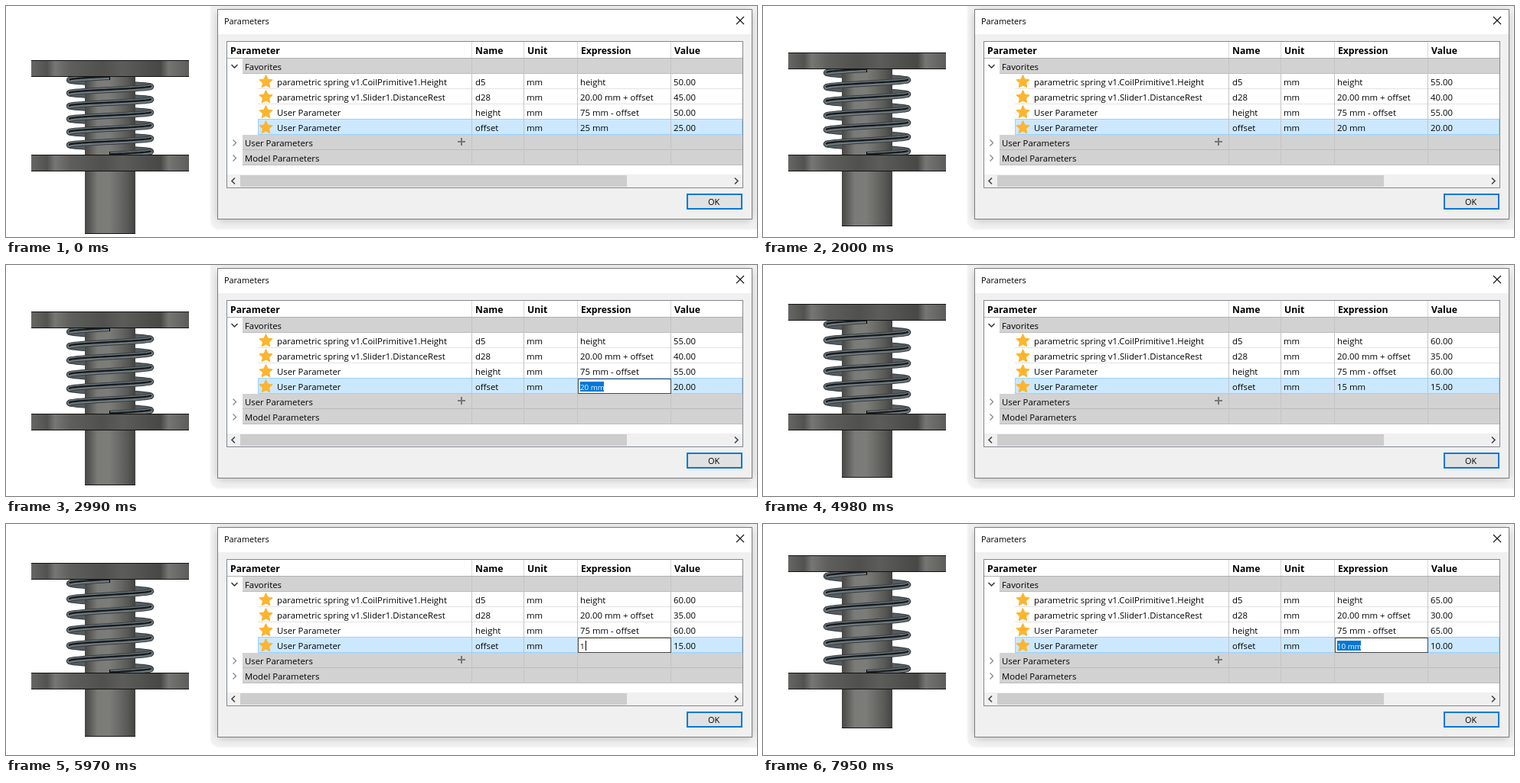
Recreate the animation shown at these times as an HTML page with a canvas. Size 981 px wide and 303 px high, loop 8000 ms.

```html
<!DOCTYPE html>
<html lang="en">
<head>
<meta charset="utf-8">
<title>Parametric spring</title>
<style>
html, body { margin: 0; width: 981px; height: 303px; overflow: hidden; background: #fff; }
canvas { display: block; }
</style>
</head>
<body>
<canvas id="stage" width="981" height="303"></canvas>
<script>
const ctx = document.getElementById('stage').getContext('2d');
const LOOP = 8000;
const AXIS = 136, SEAT = 195, TURNS = 6;
const COLUMNS = [608, 676, 746, 868];
const ROW_TOP = 69, ROW = 20;

// start time, offset in mm, edit field (mode and text)
const STEPS = [
  { at: 0, offset: 25 },
  { at: 1000, offset: 25, edit: '25 mm', mode: 'selected' },
  { at: 2000, offset: 20 },
  { at: 2990, offset: 20, edit: '20 mm', mode: 'selected' },
  { at: 3990, offset: 20, edit: '1', mode: 'caret' },
  { at: 4980, offset: 15 },
  { at: 5970, offset: 15, edit: '1', mode: 'caret' },
  { at: 6960, offset: 15, edit: '10' },
  { at: 7950, offset: 10, edit: '10 mm', mode: 'selected' }
];

function rect(x, y, w, h, fill) {
  ctx.fillStyle = fill;
  ctx.fillRect(x, y, w, h);
}

function frame(x, y, w, h, color, size = 1) {
  ctx.strokeStyle = color;
  ctx.lineWidth = size;
  ctx.strokeRect(x + size / 2, y + size / 2, w - size, h - size);
}

function text(str, x, y, { size = 11.35, weight = 400, color = '#000', align = 'left' } = {}) {
  ctx.font = `${weight} ${size}px "Open Sans", "Noto Sans", sans-serif`;
  ctx.textAlign = align;
  ctx.fillStyle = color;
  ctx.fillText(str, x, y);
}

function line(points, color, width = 1) {
  ctx.strokeStyle = color;
  ctx.lineWidth = width;
  ctx.beginPath();
  points.forEach(([x, y]) => ctx.lineTo(x, y));
  ctx.stroke();
}

function shade(x0, x1, stops) {
  const g = ctx.createLinearGradient(x0, 0, x1, 0);
  stops.forEach(([at, color]) => g.addColorStop(at, color));
  return g;
}

const plateFill = shade(33, 239, [
  [0, '#666764'], [.1, '#525250'], [.15, '#767774'], [.25, '#5e5f5c'], [.45, '#50504e'],
  [.58, '#5c5c5a'], [.76, '#4c4c4a'], [.82, '#484846'], [.87, '#757672'], [1, '#5c5d5a']
]);
const shaftFill = shade(103, 169, [
  [0, '#474745'], [.1, '#5a5b58'], [.25, '#7a7b77'], [.48, '#7c7d79'],
  [.65, '#6c6d69'], [.85, '#585956'], [1, '#424240']
]);

function plate(y) {
  rect(33, y, 206, 21, plateFill);
  rect(33, y, 206, 1, '#111');
  rect(33, y + 21, 206, 1, '#111');
}

// Half turns of the helix lie either behind or in front of the shaft.
function coil(pitch, front) {
  const end = TURNS * 2 * Math.PI;
  const first = front ? -.5 : .5;
  for (let h = first; h < TURNS * 2; h += 2) {
    const from = Math.max(0, h * Math.PI), to = Math.min(end, (h + 1) * Math.PI);
    if (to <= from) continue;
    const path = shift => {
      const points = [];
      for (let i = 0; i <= 24; i++) {
        const a = from + (to - from) * i / 24;
        points.push([AXIS + 53 * Math.sin(a), SEAT - pitch * a / (2 * Math.PI) + shift]);
      }
      return points;
    };
    ctx.lineCap = from === 0 || to === end ? 'butt' : 'round';
    line(path(0), '#353b3f', 8);
    line(path(0), front ? '#70797d' : '#555d61', 6);
    if (front) line(path(-.5), '#171b1d', 2.4);
  }
  ctx.lineCap = 'butt';
}

function spring(offset) {
  const step = (25 - offset) / 5;
  const top = 71 - 10 * step;
  const bottom = Math.round(298 - 10.2 * step);
  const under = top + 22;

  ctx.save();
  ctx.beginPath();
  ctx.rect(70, under, 135, SEAT - under);
  ctx.clip();
  coil((SEAT - under) / TURNS, false);
  rect(103, under, 66, SEAT - under, shaftFill);
  coil((SEAT - under) / TURNS, true);
  rect(135, SEAT - 4, 1, 4, '#000');
  rect(135, under, 1, 4, '#000');
  ctx.restore();

  rect(103, 216, 66, bottom - 216, shaftFill);
  rect(103, bottom, 66, 1, '#111');
  plate(top);
  plate(SEAT);
}

function star(x, y) {
  ctx.fillStyle = ctx.strokeStyle = '#fdb52e';
  ctx.lineWidth = 1.5;
  ctx.lineJoin = 'round';
  ctx.beginPath();
  for (let i = 0; i < 10; i++) {
    const a = i * Math.PI / 5, r = i % 2 ? 4 : 8.5;
    ctx.lineTo(x + r * Math.sin(a), y - r * Math.cos(a));
  }
  ctx.closePath();
  ctx.fill();
  ctx.stroke();
  ctx.lineJoin = 'miter';
}

function chevron(x, y, dx, dy, color, width = 1.3) {
  const p = dx ? [[x - dx, y - 4], [x + dx, y], [x - dx, y + 4]]
               : [[x - 4, y - dy], [x, y + dy], [x + 4, y - dy]];
  line(p, color, width);
}

function shadow(x, y, w, h, blur, color) {
  ctx.save();
  ctx.filter = `blur(${blur}px)`;
  ctx.fillStyle = color;
  ctx.beginPath();
  ctx.roundRect(x, y, w, h, 12);
  ctx.fill();
  ctx.restore();
}

function dialog() {
  shadow(267, -12, 725, 305, 1, '#f0f0f0');
  shadow(274, 4, 703, 280, 3, '#d2d2d2');
  rect(276, 4, 699, 276, '#f0f0f0');
  rect(276, 4, 699, 33, '#fff');
  frame(276, 4, 699, 276, '#7c7c7c');
  text('Parameters', 285, 24, { size: 10.9 });
  line([[954, 14], [964, 24]], '#111', 1.1);
  line([[964, 14], [954, 24]], '#111', 1.1);

  rect(288, 46, 675, 193, '#fff');
  rect(289, 68, 673, 1, '#b0b0b0');
  ['Parameter', 'Name', 'Unit', 'Expression', 'Value'].forEach((label, i) =>
    text(label, [293, 613, 681, 751, 873][i], 63, { size: 12.2, weight: 700 }));
}

function group(label, row, open) {
  const y = ROW_TOP + ROW * row;
  rect(309, y, 653, ROW, '#d2d2d2');
  rect(309, y + ROW - 1, 653, 1, '#bcbcbc');
  text(label, 312, y + 15);
  if (open) chevron(298.5, y + 10, 0, 2, '#333', 1.5);
  else chevron(298.5, y + 10.5, 2, 0, '#888');
}

function table({ offset, edit, mode }) {
  const height = 75 - offset;
  group('Favorites', 0, true);
  group('User Parameters', 5);
  group('Model Parameters', 6);
  rect(590, 177, 10, 2, '#777');
  rect(594, 173, 2, 10, '#777');

  for (let row = 2; row < 5; row++) rect(329, ROW_TOP + ROW * row - 1, 633, 1, '#e2e2e2');
  rect(329, 148, 633, 21, '#cce8ff');
  frame(329, 148, 633, 21, '#99d1ff');
  COLUMNS.forEach(x => {
    rect(x, 47, 1, 21, '#d8d8d8');
    rect(x, ROW_TOP, 1, ROW * 7, '#c4c4c4');
  });

  [
    ['parametric spring v1.CoilPrimitive1.Height', 'd5', 'height', height],
    ['parametric spring v1.Slider1.DistanceRest', 'd28', '20.00 mm + offset', 20 + offset],
    ['User Parameter', 'height', '75 mm - offset', height],
    ['User Parameter', 'offset', edit ? '' : offset + ' mm', offset]
  ].forEach(([label, name, expression, value], i) => {
    const y = 104 + ROW * i;
    star(339.5, y - 4.5);
    text(label, 354, y);
    text(name, 613, y);
    text('mm', 680, y);
    text(expression, 750, y);
    text(value.toFixed(2), 872, y);
  });

  if (!edit) return;
  rect(747, 149, 122, ROW, '#fff');
  frame(747, 149, 122, ROW, '#4a4a4a');
  const selected = mode === 'selected';
  if (selected) rect(750, 153, 31, 13, '#0078d7');
  text(edit, 750, 164, { size: 9.8, color: selected ? '#fff' : '#000' });
  if (mode === 'caret') rect(757, 153, 1, 13, '#000');
}

function controls() {
  rect(289, 221, 673, 17, '#f0f0f0');
  rect(306, 222, 505, 15, '#cdcdcd');
  chevron(297, 229.5, -2, 0, '#444', 1.6);
  chevron(954, 229.5, 2, 0, '#444', 1.6);
  frame(288, 46, 675, 193, '#828790');

  rect(889, 246, 73, 21, '#e1e1e1');
  frame(889, 246, 73, 21, '#0078d7', 2);
  text('OK', 924.5, 261, { size: 10.9, align: 'center' });
}

function draw(now) {
  const t = now % LOOP;
  const step = STEPS.findLast(s => s.at <= t);
  rect(0, 0, 981, 303, '#fff');
  spring(step.offset);
  dialog();
  table(step);
  controls();
  requestAnimationFrame(draw);
}
requestAnimationFrame(draw);
</script>
</body>
</html>
```
